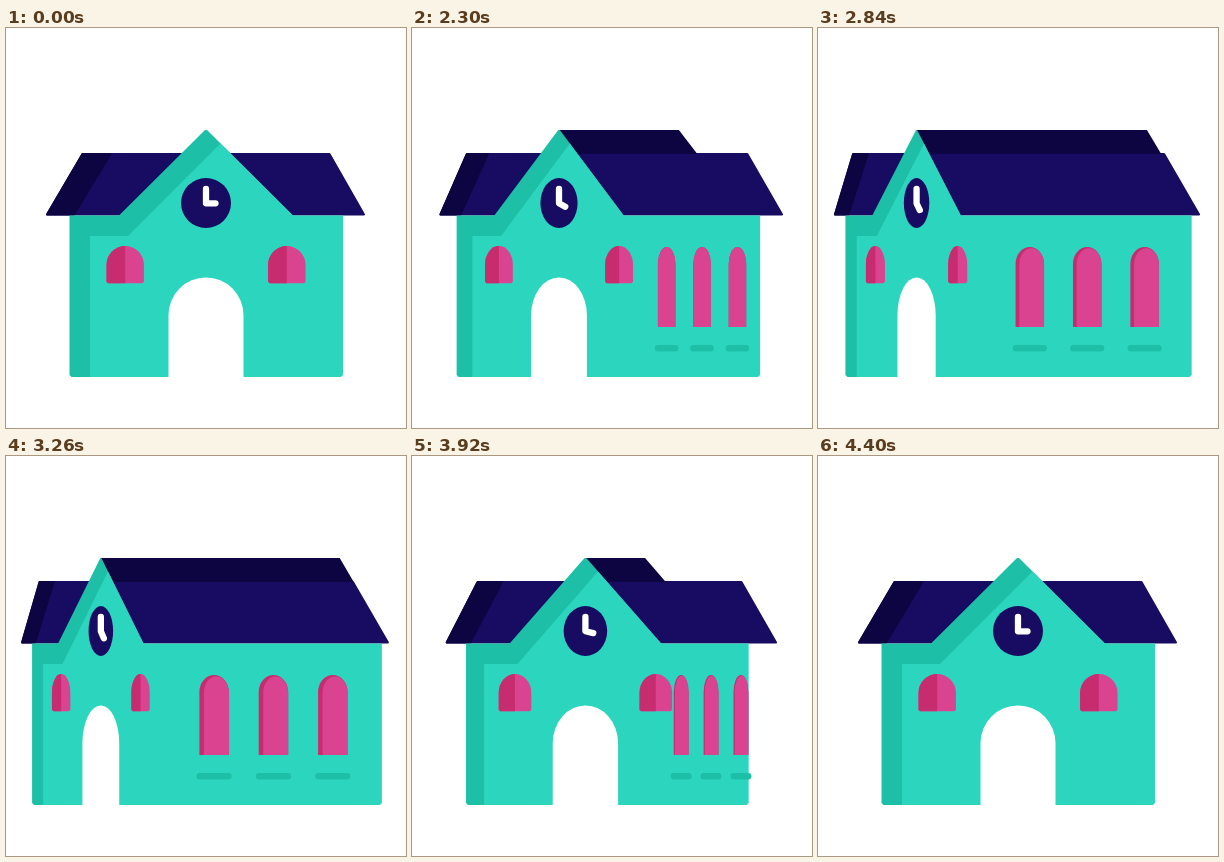
An HTML page with a canvas for the animation above (4430 ms loop, 400x400 px).

```html
<!DOCTYPE html>
<html lang="en">
<head>
<meta charset="utf-8">
<title>School</title>
<style>
  html, body { margin: 0; width: 100%; height: 100%; overflow: hidden; background: #fff; }
  canvas { display: block; width: 400px; height: 400px; }
</style>
</head>
<body>
<canvas id="stage" width="400" height="400"></canvas>
<script>
const ctx = document.getElementById('stage').getContext('2d');

const TEAL = '#2cd5be', TEAL_DARK = '#1dc0a7';
const NAVY = '#170b62', NAVY_DARK = '#0d0541';
const PINK = '#d9438f', PINK_DARK = '#c72c6f';

const LOOP = 4430, FIRST = 2030, STEP = 30;
const TURN = [2000, 3140], BACK = [3200, 4400];

const mix = (a, b, p) => a + (b - a) * p;
const span = (t, [a, b]) => Math.min(1, Math.max(0, (t - a) / (b - a)));

// cubic-bezier(x1, 0, x2, 1)
function ease(u, x1, x2) {
  if (u <= 0 || u >= 1) return u;
  let lo = 0, hi = 1;
  for (let i = 0; i < 30; i++) {
    const m = (lo + hi) / 2, n = 1 - m;
    if (3 * m * n * n * x1 + 3 * m * m * n * x2 + m * m * m < u) lo = m;
    else hi = m;
  }
  return lo * lo * (3 - 2 * lo);
}

// 0 is the front view, 1 the fully turned view
function turn(t, go, home) {
  return t < BACK[0]
    ? ease(span(t, TURN), ...go)
    : 1 - ease(span(t, BACK), ...home);
}

function poly(color, points, round) {
  ctx.beginPath();
  points.forEach(([x, y]) => ctx.lineTo(x, y));
  ctx.closePath();
  ctx.fillStyle = color;
  ctx.fill();
  if (round) {
    ctx.strokeStyle = color;
    ctx.lineWidth = 2;
    ctx.lineJoin = 'round';
    ctx.stroke();
  }
}

function line(color, width, points) {
  ctx.beginPath();
  points.forEach(([x, y]) => ctx.lineTo(x, y));
  ctx.strokeStyle = color;
  ctx.lineWidth = width;
  ctx.lineCap = ctx.lineJoin = 'round';
  ctx.stroke();
}

function arch(color, x, w, top, bottom, ry, corner = 0) {
  const r = w / 2, c = Math.min(corner, r);
  ctx.beginPath();
  ctx.moveTo(x + c, bottom);
  ctx.lineTo(x, bottom - corner);
  ctx.lineTo(x, top + ry);
  ctx.ellipse(x + r, top + ry, r, ry, 0, Math.PI, 2 * Math.PI);
  ctx.lineTo(x + w, bottom - corner);
  ctx.lineTo(x + w - c, bottom);
  ctx.fillStyle = color;
  ctx.fill();
}

function roof(p, cx) {
  const left = mix(41, 16, p), topLeft = mix(76.5, 33.5, p);
  poly(NAVY, [
    [topLeft, 126], [mix(323.5, 347, p), 126],
    [mix(358, 382, p), 186.5], [left, 186.5]
  ], true);
  poly(NAVY_DARK, [
    [topLeft, 126], [topLeft + mix(28, 14, p), 126],
    [left + mix(27, 13, p), 186.5], [left, 186.5]
  ], true);
  if (p > 0) {
    poly(NAVY_DARK, [
      [cx, 102], [mix(199, 334, p), 102], [mix(222, 348, p), 126], [cx, 126]
    ]);
  }
}

function front(p, cx) {
  const k = 1 - 0.51 * p, X = x => cx + x * k;
  const left = mix(63.5, 26, p), inner = left + mix(20.5, 11, p);
  const d = 1 - p;
  const right = Math.max(X(137), 376 - (63.1 - 14 * d) * d);

  poly(TEAL_DARK, [
    [left, 187.5], [inner + 5, 187.5], [inner + 5, 349], [left + 2, 349], [left, 347]
  ]);
  poly(TEAL_DARK, [
    [inner, 187.5], [X(-87), 187.5], [X(-1), 102], [X(1), 102],
    [X(87), 187.5], [X(87), 208], [inner, 208]
  ]);
  poly(TEAL, [
    [X(14.5), 115.5], [X(87), 187.5], [right, 187.5], [right, 347],
    [right - 2, 349], [inner, 349], [inner, 208], [X(-78), 208]
  ]);

  arch('#fff', X(-37.5), 75 * k, 249.5, 350, 37.5);
  for (const x of [-80.8, 80.8]) {
    ctx.save();
    arch(PINK, X(x - 18.7), 37.4 * k, 218, 255.3, 18.7, 1.5);
    ctx.beginPath();
    ctx.rect(X(x - 20), 210, 20 * k, 50);
    ctx.clip();
    arch(PINK_DARK, X(x - 18.7), 37.4 * k, 218, 255.3, 18.7, 1.5);
    ctx.restore();
  }

  ctx.beginPath();
  ctx.ellipse(cx, 175, 25 * k, 25, 0, 0, 2 * Math.PI);
  ctx.fillStyle = NAVY;
  ctx.fill();
  line('#fff', 6.3, [
    [cx, 161], [cx, 175.3], [cx + mix(9.5, 3, p), 175.3 + 7 * p]
  ]);
}

function side(s, place, shade) {
  const mid = 267.3 + 63.8 * (1 - place);
  for (const i of [-1, 0, 1]) {
    const x = mid + 59.5 * s * i, w = 29.5 * s, edge = 4.5 * s * shade;
    arch(PINK_DARK, x - w / 2, w, 219, 299, 17);
    arch(PINK, x - w / 2 + edge, w - edge, 219 + 1.5 * shade, 299, 16);
    line(TEAL_DARK, 6.5, [[x - 14.35 * s, 320.3], [x + 14.35 * s, 320.3]]);
  }
}

function draw(ms) {
  const t = ms < FIRST ? 0 : FIRST + STEP * Math.floor((ms - FIRST) / STEP);
  const p = turn(t, [0.22, 0.145], [0.63, 0.36]);
  const cx = mix(200, 94.6, p);
  ctx.fillStyle = '#fff';
  ctx.fillRect(0, 0, 400, 400);
  roof(p, cx);
  front(p, cx);
  if (p > 0) {
    const home = [0.62, 0.65];
    side(turn(t, [0.09, 0.133], home), turn(t, [0.09, 0.056], home),
      turn(t, [0.6, 0.55], home));
  }
}

const start = performance.now();
function tick() {
  draw((performance.now() - start) % LOOP);
  requestAnimationFrame(tick);
}
tick();
</script>
</body>
</html>
```
